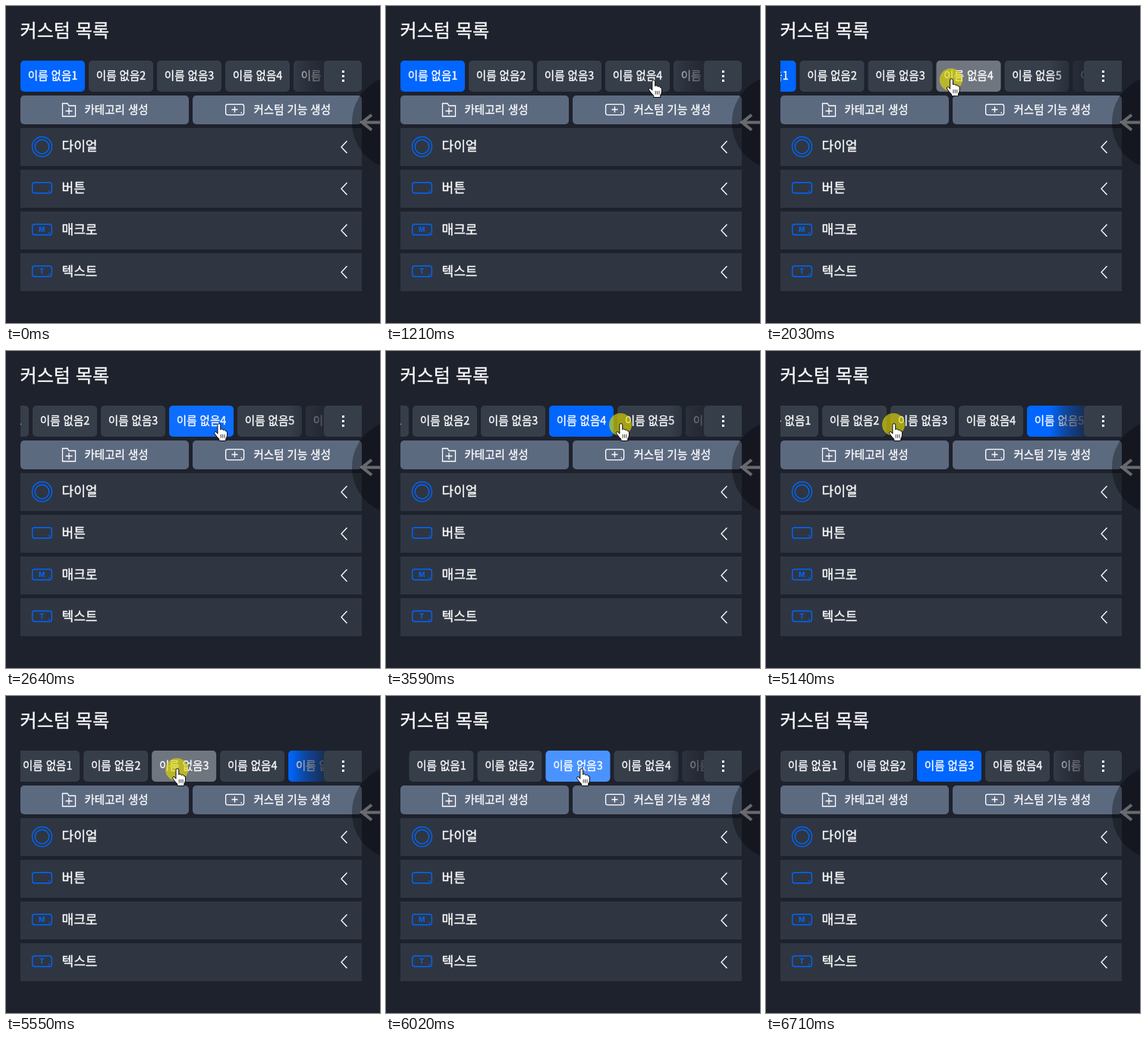
An HTML page that plays this animation: 493 by 418 pixels, repeating every 7.31 s.

```html
<!DOCTYPE html>
<html lang="ko">
<head>
<meta charset="utf-8">
<title>커스텀 목록</title>
<style>
  html, body { margin: 0; width: 100%; height: 100%; overflow: hidden; background: #1e222d; }
  svg { display: block; width: 100%; height: 100%; }
  text {
    font-family: 'Noto Sans CJK KR', 'Noto Sans CJK', sans-serif; font-weight: 500; font-size: 14.5px;
    fill: #fff; stroke: #fff; stroke-width: .3;
  }
  .title { font-size: 24.1px; }
  .label { font-size: 17px; }
  .glyph { font: 700 9px Inter, sans-serif; fill: #06f; stroke: none; text-anchor: middle; }
  .line { fill: none; stroke: #fff; stroke-width: 1.3; }
  .blue { fill: none; stroke: #06f; stroke-width: 1.35; }
</style>
</head>
<body>
<svg viewBox="0 0 493 418">
  <defs>
    <clipPath id="strip"><rect x="19" y="72" width="450" height="41"/></clipPath>
    <linearGradient id="fade">
      <stop offset="0" stop-color="#1e222d" stop-opacity="0"/>
      <stop offset=".4" stop-color="#1e222d" stop-opacity=".45"/>
      <stop offset="1" stop-color="#1e222d" stop-opacity=".88"/>
    </linearGradient>
  </defs>
  <rect width="493" height="418" fill="#1e222d"/>
  <text class="title" x="18.500" y="41">커스텀 목록</text>

  <g clip-path="url(#strip)">
    <g id="tabs"></g>
    <rect x="374" y="72" width="50" height="41" fill="url(#fade)"/>
    <rect x="419" y="72" width="50" height="41" rx="5" fill="#363e4a"/>
  </g>
  <path d="M443 85h3v3h-3zM443 91h3v3h-3zM443 97h3v3h-3z" fill="#fff"/>

  <g fill="#5c6a80">
    <rect x="19" y="118" width="222" height="38" rx="5"/>
    <rect x="246" y="118" width="223" height="38" rx="5"/>
  </g>
  <path class="line" d="M74.500 128.500h6.500l2 3h8.500v14h-17zM83 134v9M78.500 138.500h9"/>
  <text x="103.500" y="141.500">카테고리 생성</text>
  <rect class="line" x="289.600" y="129.600" width="24" height="14" rx="2.500"/>
  <path class="line" d="M301.500 132.500v8M297.500 136.500h8M309.500 141h1.500"/>
  <text x="326.500" y="141.500">커스텀 기능 생성</text>

  <g id="rows"></g>

  <circle cx="518.400" cy="153.500" r="62.400" fill="#000" fill-opacity=".32"/>
  <path d="M482 143.500l-12.500 10l12.500 10M469.500 153.500H494" fill="none" stroke="#fff" stroke-opacity=".36" stroke-width="4"/>

  <g id="cursor">
    <circle id="touch" r="15" fill="#e0d800" fill-opacity=".65"/>
    <g transform="translate(.8 -1.500) scale(.96)" stroke="#000">
      <path d="M-2 2.200a2 2 0 0 1 4 0V8.500q.5-1.200 2-.8t1.800 1.600q.7-.9 1.900-.4t1.400 1.600q1.900-.6 2 1.600V16q0 2.500-1.800 5V24H0V21.500Q-3 19-6.300 13.800q-.6-2 1-2.400t3.300 2.800Z"
        fill="#fff" stroke-linejoin="round"/>
      <path d="M2.500 15v5M5 15v5M7.500 15v5" stroke-width=".8"/>
    </g>
  </g>
</svg>
<script>
const LOOP = 7310, DRAG = 690, RELEASE = 750, TRAVEL = 700, SPRING = 480, LAG = 70;

// Each drag presses a tab, pulls the strip to a scroll offset and selects the tab on release
const drags = [
  { start: 1480, tab: 3, from: 352, to: 231, scroll: 74 },
  { start: 3590, tab: 4, from: 309, to: 376, scroll: 35 },
  { start: 5140, tab: 2, from: 168, to: 257, scroll: -14 }
];

const $ = id => document.getElementById(id);
const clamp = v => Math.max(0, Math.min(1, v));
const ramp = (t, start, span) => clamp((t - start) / span);
const glide = (t, start, span) => {
  const p = ramp(t, start, span);
  return p * p * (3 - 2 * p);
};
const place = (el, x, y) => el.setAttribute('transform', `translate(${x} ${y})`);

function add(parent, tag, attrs, text) {
  const el = document.createElementNS('http://www.w3.org/2000/svg', tag);
  for (const key in attrs) el.setAttribute(key, attrs[key]);
  if (text) el.textContent = text;
  return parent.appendChild(el);
}

function addIcon(g, letter) {
  if (letter === 'O') {
    for (const r of [13, 9.3]) add(g, 'circle', { class: 'blue', cx: 47.5, cy: 24.5, r });
    return;
  }
  add(g, 'rect', { class: 'blue', x: 34.7, y: 16.7, width: 25.6, height: 14, rx: 3 });
  add(g, 'path', { class: 'blue', d: 'M56 28h1.5' });
  add(g, 'text', { class: 'glyph', x: 47.3, y: 27 }, letter);
}

['다이얼', '버튼', '매크로', '텍스트'].forEach((name, i) => {
  const g = add($('rows'), 'g', {});
  place(g, 0, 161 + 55 * i);
  add(g, 'rect', { x: 19, width: 450, height: 50, fill: '#2f3641' });
  addIcon(g, 'O MT'[i].trim());
  add(g, 'text', { class: 'label', x: 73.5, y: 29.5 }, name);
  add(g, 'path', { class: 'line', d: 'M449.5 17L442 25l7.5 8' });
});

const tabs = Array.from({ length: 6 }, (_, i) => {
  const g = add($('tabs'), 'g', {});
  place(g, 19 + 90 * i, 72);
  const box = { width: 85, height: 41, rx: 5 };
  const base = add(g, 'rect', box);
  const glow = add(g, 'rect', { ...box, fill: '#fff' });
  add(g, 'text', { x: 9.8, y: 25.3 }, '이름 없음' + (i + 1));
  return { base, glow };
});

// Enter from below, settle on a tab, perform the drags, leave downwards
function pointerAt(t) {
  let x = 444, y = 394;
  const go = (start, span, toX, toY) => {
    const p = glide(t, start, span);
    x += (toX - x) * p;
    y += (toY - y) * p;
  };
  go(70, 130, 309, 64);
  go(340, 340, 352, 99);
  drags.forEach(({ start, to }, i) => {
    go(start, DRAG, to, 97);
    if (i + 1 < drags.length) go(start + RELEASE, TRAVEL, drags[i + 1].from, 97);
  });
  go(6360, 350, 334, 200);
  return [x, y];
}

function scrollAt(t) {
  let offset = 0;
  for (const { start, scroll } of drags) {
    offset += (scroll - offset) * glide(t, start + LAG, DRAG - LAG);
    if (scroll < 0) offset *= 1 - glide(t, start + RELEASE, SPRING);
  }
  return offset;
}

function draw(t) {
  const held = drags.some(d => t >= d.start && t < d.start + RELEASE);
  const done = drags.filter(d => t >= d.start + RELEASE).pop();
  const selected = done ? done.tab : 0;

  tabs.forEach(({ base, glow }, i) => {
    const d = drags.find(drag => drag.tab === i);
    const light = d ? ramp(t, d.start, 200) * (1 - ramp(t, d.start + RELEASE + 160, 300)) : 0;
    base.setAttribute('fill', i === selected ? '#06f' : '#363e4a');
    glow.setAttribute('opacity', 0.29 * light);
  });
  place($('tabs'), -scrollAt(t), 0);
  place($('cursor'), ...pointerAt(t));
  $('cursor').setAttribute('visibility', t >= 70 && t < 6709 ? 'visible' : 'hidden');
  $('touch').setAttribute('opacity', held ? 1 : 0);
}

const begin = performance.now();
function tick() {
  draw((performance.now() - begin) % LOOP);
  requestAnimationFrame(tick);
}
tick();
</script>
</body>
</html>
```
